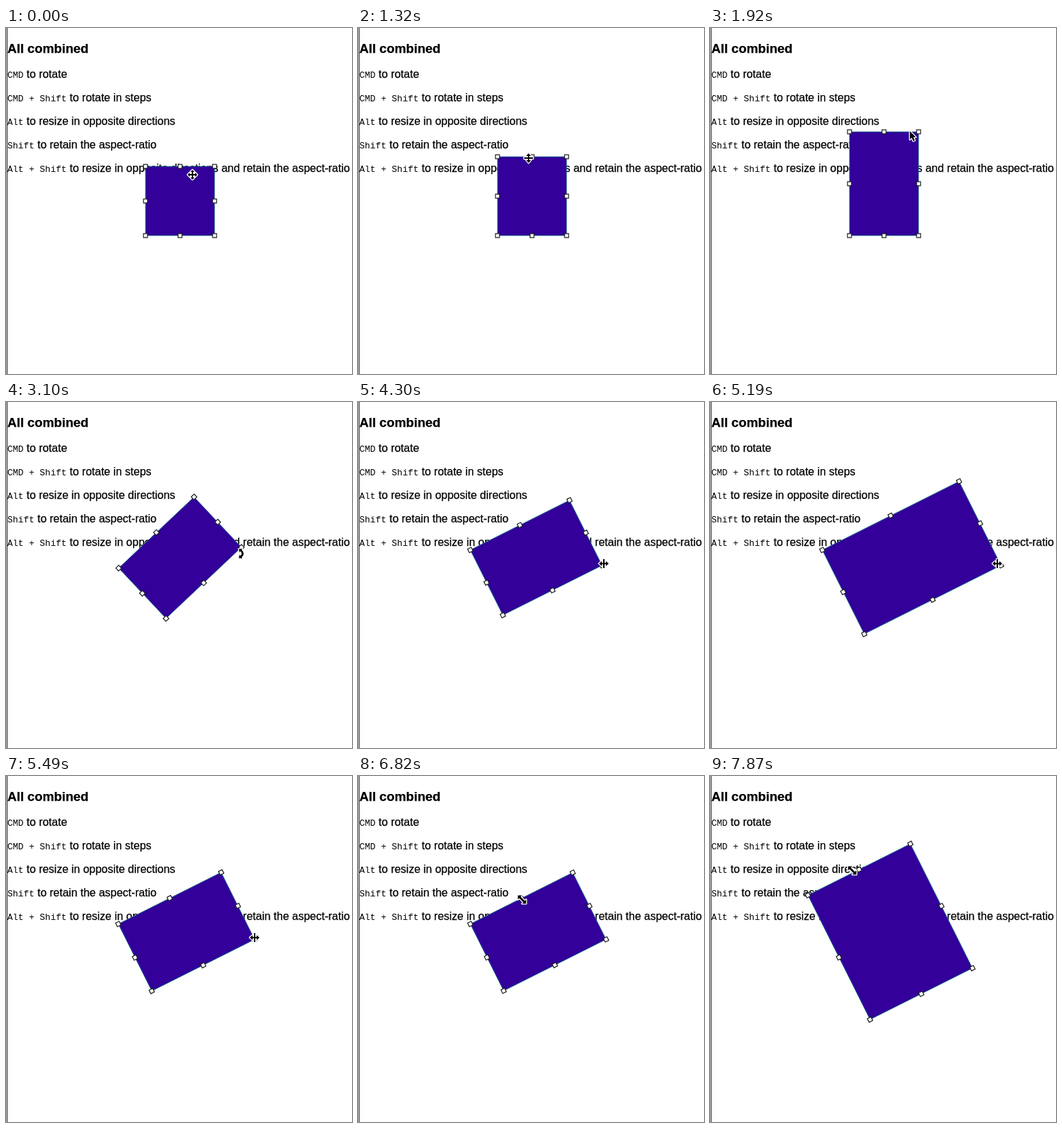
An HTML page that plays this animation: 501x500 px, repeating every 8 s.

```html
<!DOCTYPE html>
<html lang="en">
<head>
<meta charset="utf-8">
<title>All combined</title>
<style>
  html, body { margin: 0; width: 100%; height: 100%; overflow: hidden; background: #fff; }
  svg { display: block; width: 100%; height: 100%; }
  text { font: 16px "Liberation Sans", Arial, sans-serif; fill: #000; stroke: #000; stroke-width: .25; }
  .title { font-size: 18.72px; font-weight: bold; }
  .key { font: 13px "Liberation Mono", "Courier New", monospace; stroke: none; }
  .box { fill: #309; stroke: #1a7a90; stroke-width: .8; }
  .handle { fill: #fff; stroke: #1a1a1a; stroke-width: 1.2; }
  #cursor { fill: #000; stroke: #fff; stroke-width: 2.6; stroke-linejoin: round; paint-order: stroke; }
</style>
</head>
<body>
<svg id="stage" viewBox="0 0 501 500">
  <rect x="1" width="1" height="500"/>
  <text class="title" x="2" y="36">All combined</text>
  <g id="lines"></g>
  <g id="shape"></g>
  <path id="cursor"/>
</svg>
<script>
const LOOP = 8000;
const RAD = Math.PI / 180;
const FINAL_ANGLE = 63.4;
const HANDLE = 5.8;
const byId = id => document.getElementById(id);

function set(el, attrs) {
  for (const k in attrs) el.setAttribute(k, attrs[k]);
}

function add(parent, tag, attrs, text) {
  const el = document.createElementNS('http://www.w3.org/2000/svg', tag);
  set(el, attrs);
  if (text) el.textContent = text;
  parent.appendChild(el);
  return el;
}

[
  ['CMD', 'to rotate'],
  ['CMD + Shift', 'to rotate in steps'],
  ['Alt', 'to resize in opposite directions'],
  ['Shift', 'to retain the aspect-ratio'],
  ['Alt + Shift', 'to resize in opposite directions and retain the aspect-ratio']
].forEach(([key, use], i) => {
  const line = add(byId('lines'), 'text', { x: 2, y: 72 + 34 * i });
  add(line, 'tspan', { class: 'key' }, key);
  line.append(' ' + use);
});

const shape = byId('shape');
const cursor = byId('cursor');
const box = add(shape, 'rect', { class: 'box' });
const handles = [];
for (const u of [-.5, 0, .5])
  for (const v of [-.5, 0, .5])
    if (u || v) {
      const el = add(shape, 'rect', { class: 'handle', width: HANDLE, height: HANDLE });
      handles.push({ u, v, el });
    }

const BAR = 'M-7 0L-3-3.5V-1H-1V-6.5H1V-1H3V-3.5L7 0 3 3.5V1H1V6.5H-1V1H-3V3.5Z';
const cursors = {
  move: 'M0-7L3-4H1V-1H4V-3L7 0 4 3V1H1V4H3L0 7-3 4H-1V1H-4V3L-7 0-4-3V-1H-1V-4H-3Z',
  arrow: 'M.3 1V13.2L3.1 10.6 5.3 15.4 7.6 14.4 5.4 9.8H9.1Z',
  ew: BAR,
  ns: BAR,
  nwse: 'M-6-6H0L-2-4 4 2 6 0V6H0L2 4-4-2-6 0Z',
  turn: 'M-3.5-6.5L1.5-7 .8-5.3Q6.5 0 .8 5.3L1.7 7-3.5 6.5-2.3 1.6-1 3.4Q2.2 0-1-3.4L-2.3-1.6Z'
};

// Each track holds [time, value...] until the next entry.
const topEdge = [[0, 200], [1320, 186], [1470, 161], [1620, 150]];
const turn = [[0, 0], [2810, 8], [2960, 22], [3100, 46.7], [3250, FINAL_ANGLE]];
const drag = [
  [0, 0], [4300, 12], [4450, 40], [4590, 68], [4740, 89.6], [4890, 95],
  [5190, 80], [5340, 45], [5490, 18.6], [5640, 17.8]
];
const grow = [[0, 0], [7570, 14], [7720, 33], [7870, 46.5]];
const pointer = [
  [0, 270, 212, 'move'], [290, 266, 209, 'move'], [440, 257, 205, 'move'],
  [580, 249, 203, 'ns'], [730, 247, 202.5, 'ns'],
  [1320, 247, 188, 'ns'], [1470, 247, 163, 'ns'], [1620, 247, 152.5, 'ns'],
  [1920, 289, 148, 'arrow'], [2070, 296, 146, 'arrow'], [2210, 302, 146, 'turn'],
  [2810, 313, 160, 'turn'], [2960, 328, 181, 'turn'], [3100, 340.5, 219, 'turn'],
  [3250, 342, 233.5, 'turn'], [3700, 342, 233.5, 'ew'],
  [4300, 356, 233.5, 'ew'], [4450, 386, 233.5, 'ew'], [4590, 415, 233.5, 'ew'],
  [4740, 436, 233.5, 'ew'], [4890, 439.5, 233.5, 'ew'],
  [5190, 416, 233.5, 'ew'], [5340, 379, 233.5, 'ew'], [5490, 360, 233.5, 'ew'],
  [5780, 342, 229, 'move'], [5930, 297, 212, 'move'], [6080, 250, 189, 'move'],
  [6230, 223, 173, 'arrow'], [6380, 232, 173, 'arrow'], [6820, 237.5, 178.5, 'nwse'],
  [7570, 228, 166, 'nwse'], [7720, 215, 148, 'nwse'], [7870, 206, 136.5, 'nwse']
];

function at(track, t) {
  let hit = track[0];
  for (const step of track) if (step[0] <= t) hit = step;
  return hit;
}

function draw(t) {
  const top = at(topEdge, t)[1];
  const angle = at(turn, t)[1];
  const d = at(drag, t)[1];
  const g = at(grow, t)[1];

  // A sideways drag of one corner stretches both local axes.
  const w = 100 + d * Math.cos(FINAL_ANGLE * RAD) + 2 * g;
  const h = 300 - top + d * Math.sin(FINAL_ANGLE * RAD);
  set(shape, { transform: `translate(${252 + d / 2} ${(top + 300) / 2}) rotate(${angle})` });
  set(box, { x: -w / 2, y: -h / 2, width: w, height: h });
  for (const { u, v, el } of handles) set(el, { x: u * w - HANDLE / 2, y: v * h - HANDLE / 2 });

  const [, x, y, kind] = at(pointer, t);
  const spin = kind === 'ns' ? 90 : kind === 'turn' ? 45 * Math.round(angle / 45 - 1) : 0;
  set(cursor, { d: cursors[kind], transform: `translate(${x} ${y}) rotate(${spin})` });
}

const start = performance.now();
function tick() {
  draw((performance.now() - start) % LOOP);
  requestAnimationFrame(tick);
}
tick();
</script>
</body>
</html>
```
